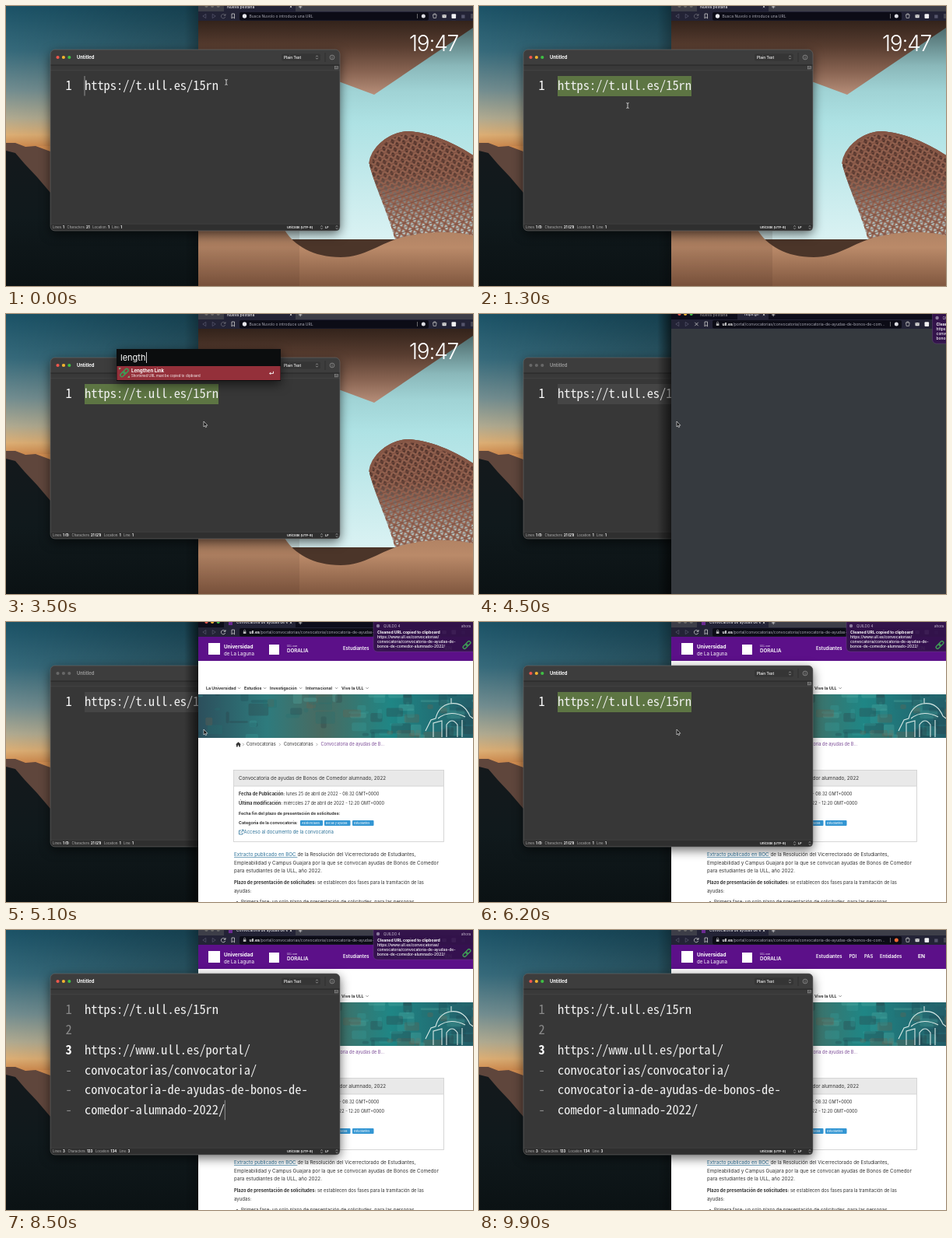
An HTML page for the animation above (10 s loop, 600x360 px).

```html
<!DOCTYPE html>
<html lang="es">
<head>
<meta charset="utf-8">
<style>
html, body { margin: 0; width: 100%; height: 100%; overflow: hidden; background: #061015; }
svg { display: block; width: 600px; height: 360px; }
text { font-family: Inter, "Open Sans", sans-serif; fill: #fff; white-space: pre; }
.mono text { font-family: "Noto Sans Mono CJK JP", "Noto Sans Mono CJK SC", "Noto Sans Mono", monospace; }
.frame { filter: drop-shadow(0 4px 7px rgba(0,0,0,.6)); }
.off .dot { fill: #686868; }
.off .active { opacity: .45; }
.tabs { fill: #0d0d1b; }
.off .tabs { fill: #3d3e48; }
.site text { fill: #333; }
.site .w text, .site text.w { fill: #fff; }
</style>
</head>
<body>
<svg id="stage" viewBox="0 0 600 360"></svg>
<script>
const LOOP = 10000;
const stage = document.getElementById('stage');
const $ = id => document.getElementById(id);

// Text is placed by its left edge and the middle of its capitals.
const txt = (x, y, size, s, attrs = '') =>
  `<text x="${x}" y="${y + size * .36}" font-size="${size}" ${attrs}>${s}</text>`;
const bold = s => `<tspan font-weight="700">${s}</tspan>`;
const B = 'font-weight="700"';
const rect = (x, y, w, h, fill, attrs = '') =>
  `<rect x="${x}" y="${y}" width="${w}" height="${h}" fill="${fill}" ${attrs}/>`;
const dot = (x, y, r, fill, cls = '') => `<circle class="${cls}" cx="${x}" cy="${y}" r="${r}" fill="${fill}"/>`;
const path = (d, fill, attrs = '') => `<path d="${d}" fill="${fill}" ${attrs}/>`;
const line = (d, color, w = .7, attrs = '') => path(d, 'none', `stroke="${color}" stroke-width="${w}" ${attrs}`);
const group = (id, body, attrs = '') => `<g id="${id}" ${attrs}>${body}</g>`;
const grad = (id, stops, dir = 'x2="0" y2="1"') => `<linearGradient id="${id}" ${dir}>` +
  stops.map(([o, c]) => `<stop offset="${o}" stop-color="${c}"/>`).join('') + '</linearGradient>';
const lights = (x, y, step, r) => ['#f0574c', '#f2b32f', '#3fc044']
  .map((c, i) => dot(x + i * step, y, r, c, 'dot')).join('');
const updown = (x, y) => line(`M${x - 1.2} ${y - .8}l1.2-1.4 1.2 1.4m-2.4 1.6l1.2 1.4 1.2-1.4`, '#ccc', .6);
const chain = (x, y, k) => `<g transform="translate(${x} ${y}) rotate(-45) scale(${k})" fill="none" stroke="#3f9a56" stroke-width="2">
  <rect x="-8" y="-2.6" width="9" height="5.2" rx="2.6"/><rect x="-1" y="-2.6" width="9" height="5.2" rx="2.6"/></g>`;

let seed = 7;
const rnd = () => (seed = seed * 16807 % 2147483647) / 2147483647;

// Mono size that gives the editor its character advance.
const ADV = 8.19;
const pen = document.createElement('canvas').getContext('2d');
pen.font = '100px "Noto Sans Mono CJK JP", "Noto Sans Mono CJK SC", "Noto Sans Mono", monospace';
const MONO = ADV * 100 / pen.measureText('0').width;

const defs = `<defs>
  ${grad('sky', [[0, '#1b5266'], [.16, '#366a7b'], [.3, '#728d90'], [.4, '#b0aa90'], [.46, '#dcae74'], [.5, '#d08c50']])}
  ${grad('land', [[0, '#14191c'], [.5, '#10191c'], [1, '#0b1214'] ])}
  ${grad('roof', [[0, '#33231b'], [.35, '#583d30'], [.7, '#8a6553'], [1, '#b78f7a']])}
  ${grad('air', [[0, '#4d6a6c'], [.18, '#8ab8ba'], [.3, '#a0d3d5'], [.45, '#aee2e4'], [1, '#daf2f3']])}
  ${grad('sand', [[0, '#a97c5f'], [.45, '#ba8a69'], [1, '#80573f']])}
  ${grad('inside', [[0, '#4b2e27'], [.35, '#54382f'], [.75, '#b3c3c1'], [1, '#cfe3e2']])}
  ${grad('paint', [[0, '#2c4f5c'], [.25, '#2e7b7d'], [.45, '#4a6a60'], [.7, '#1f8685'], [1, '#235d68']], '')}
  <linearGradient id="edge"><stop stop-color="#000" stop-opacity="0"/><stop offset="1" stop-color="#000" stop-opacity=".6"/></linearGradient>
  <pattern id="mesh" width="9" height="11" patternUnits="userSpaceOnUse" patternTransform="rotate(-18)">
    <path d="M0 0L9 11M9 0L0 11" stroke="#94624f" stroke-width="2.4"/><path d="M0 5.5H9M0 0H9M0 11H9" stroke="#7a4c3e" stroke-width="1.2"/>
  </pattern>
  <clipPath id="strip"><rect x="247" y="93" width="353" height="56"/></clipPath>
</defs>`;

const desktop = rect(0, 0, 600, 360, 'url(#sky)') + rect(0, 0, 247, 180, 'url(#edge)', 'opacity=".4"') +
  path('M0 176L12 176 25 181 38 180 57 187 120 205 247 195V260H0Z', '#5f463c') +
  path('M0 186L12 189 24 203 40 220 57 240 120 262 190 240 247 225V360H0Z', 'url(#land)');

const towerShape = 'M467 205C467 183 490 163 515 161C545 162 575 176 600 192V320H505C494 272 476 238 467 205Z';
const photo = rect(247, 19, 353, 341, '#4b3529') +
  path('M300 28H600V300H300Z', 'url(#air)') +
  path('M247 19H600V28L473 114 430 98 247 60Z', 'url(#roof)') +
  path(towerShape, 'url(#inside)') + path(towerShape, 'url(#mesh)') +
  line('M468 203C470 184 491 165 515 163C545 164 575 178 600 194', '#855645', 4) +
  path('M247 270H350L358 288C370 308 395 323 430 323C465 323 485 300 520 295C550 289 575 290 600 295V360H247Z', 'url(#sand)') +
  rect(247, 270, 130, 90, '#3a2619', 'opacity=".12"') +
  txt(518, 48, 28, '19:47', 'font-weight="300" letter-spacing="-1.2"');

function banner() {
  let s = rect(247, 93, 353, 56, 'url(#paint)');
  const tones = ['#1d4651', '#39a09a', '#705f4b', '#24706f', '#56b1a5', '#2a3c43'];
  for (let i = 0; i < 90; i++) {
    s += rect(240 + rnd() * 360, 86 + rnd() * 60, 4 + rnd() * 22, 2 + rnd() * 14, tones[i % 6], 'rx="2" opacity=".3"');
  }
  s += line('M539 140L546 126 552 124Q556 108 570 105Q588 102 596 121L600 124M549 148V130L560 127V148M566 148V132Q573 122 580 132V148M555 124Q570 112 590 122M572 105V98M586 148V126', '#d7e8e5', 1.1);
  return `<g clip-path="url(#strip)">${s}</g>`;
}

const chevron = x => line(`M${x} 84.2l1.6 1.6 1.6-1.6`, '#444', .6);
const menu = [['La Universidad', 257, 298], ['Estudios', 306, 331], ['Investigación', 339, 377],
  ['Internacional', 385, 423], ['Vive la ULL', 431, 462.5]]
  .map(([s, x, c]) => txt(x, 85, 5.3, s, B) + chevron(c)).join('');
const tag = (x, w, s) => rect(x, 255, w, 7, '#3396d3', 'rx="1"') + txt(x + 2, 258.5, 3.7, s, 'class="w"');
const link = 'style="fill:#2c7299"';

const site = rect(247, 19, 353, 341, '#fff') + rect(247, 19, 353, 31, '#5c1089') +
  `<g class="w">${rect(260, 27, 15, 15, '#fff')}${txt(280, 32, 6.4, 'Universidad', B)}${txt(280, 41, 6.1, 'de La Laguna')}
  ${rect(338, 29, 13, 13, '#fff')}${txt(361, 30.5, 3.4, 'ULL con')}${txt(361, 37, 6.2, 'DORALIA', 'font-weight="600"')}
  ${[['Estudiantes', 433], ['PDI', 475.5], ['PAS', 495], ['Entidades', 515]].map(([s, x]) => txt(x, 34, 5.9, s, 'font-weight="600"')).join('')}
  ${txt(564, 34, 6.6, 'EN', B)}</g>` + menu + banner() +
  path('M295 157.5l3.5-3.3 3.5 3.3h-1v3h-1.7v-2h-1.6v2H296v-3z', '#333') +
  [305, 352, 399.5].map(x => line(`M${x - 1} 155.8l1.6 1.7-1.6 1.7`, '#777', .6)).join('') +
  txt(309, 157.5, 5.5, 'Convocatorias') + txt(357, 157.5, 5.5, 'Convocatorias') +
  txt(404.5, 157.5, 5.55, 'Convocatoria de ayudas de B...', 'style="fill:#7a4a96"') +
  rect(292.5, 190.5, 270, 92, '#fff', 'stroke="#ccc" stroke-width=".8"') + rect(293, 191, 269, 20, '#e9e9e9') +
  line('M293 211H562', '#ccc', .8) +
  txt(299, 200.5, 6.25, 'Convocatoria de ayudas de Bonos de Comedor alumnado, 2022') +
  txt(299, 221.5, 5.55, bold('Fecha de Publicación:') + ' lunes 25 de abril de 2022 - 08:32 GMT+0000') +
  txt(299, 233.5, 5.55, bold('Última modificación:') + ' miércoles 27 de abril de 2022 - 12:20 GMT+0000') +
  txt(299, 245.8, 5.3, 'Fecha fin del plazo de presentación de solicitudes:', B) +
  txt(299, 258, 5.3, 'Categoría de la convocatoria:', B) +
  tag(378, 29, 'Asistenciales') + tag(409, 33.5, 'Becas y ayudas') + tag(445, 27.5, 'Estudiantes') +
  line('M302 268H299.5V273H304V271M301.5 271L305 267.3M302.8 267.2H305V269.5', '#2c7299', .8) +
  txt(305.5, 270, 6, 'Acceso al documento de la convocatoria', link) +
  txt(293, 299, 6.25, '<tspan style="fill:#2c7299" text-decoration="underline">Extracto publicado en BOC </tspan>de la Resolución del Vicerrectorado de Estudiantes,') +
  txt(293, 309.5, 6.35, 'Empleabilidad y Campus Guajara por la que se convocan ayudas de Bonos de Comedor') +
  txt(293, 320, 6.3, 'para estudiantes de la ULL, año 2022.') +
  txt(293, 335, 5.8, bold('Plazo de presentación de solicitudes:') + ' se establecen dos fases para la tramitación de las') +
  txt(293, 346, 6.1, 'ayudas:') +
  txt(302, 359.5, 6.1, 'Primera fase: un solo plazo de presentación de solicitudes, para las personas') + dot(297, 360, .9, '#333');

const URL_TEXT = bold('ull.es') + '<tspan fill="#a9a9b4">/portal/convocatorias/convocatoria/convocatoria-de-ayudas-de-bonos-de-com...</tspan>';
const closeX = (x, y, r, c = '#ccc') => line(`M${x - r} ${y - r}l${2 * r} ${2 * r}m0-${2 * r}l-${2 * r} ${2 * r}`, c, .8);
const arrowHead = (x, dx) => line(`M${x} 10.4v5.2l${dx}-2.6z`, '#5a5a70');

const browser = rect(229, 0, 18, 360, 'url(#edge)', 'id="edgeShade"') + rect(247, 0, 353, 19, '#232336') +
  '<rect class="tabs" x="247" width="353" height="7"/>' +
  rect(280, 0, 92, 7, '#232336') + lights(257.5, -.2, 7.6, 2.1) +
  group('tabNew', txt(284, .7, 5, 'Nueva pestaña')) +
  group('tabLoad', '<rect class="tabs" x="280" width="52" height="7"/>' + txt(284, .7, 5, 'Nueva pestaña', 'style="fill:#999"') + txt(341, .7, 4.8, 'https:gh')) +
  group('tabSite', rect(286, -1, 5, 5, '#6b2a92') + txt(296, .7, 4.8, 'Convocatoria de ayudas de e')) +
  closeX(366, 1, 1.2) + line('M376 1h4.4M378.2-1.2v4.4', '#ddd', .8) +
  arrowHead(256.8, -4) + arrowHead(265.2, 4) +
  group('reload', line('M281.6 12A2.7 2.7 0 1 0 281.7 14M282 10V12.3H279.6', '#ccc', .8)) + group('stop', closeX(279.5, 13, 2.2)) +
  line('M290 10h3.5v6l-1.75-1.6-1.75 1.6z', '#ccc', .8) + rect(300, 8, 243, 10.4, '#0c0c16', 'rx="2"') +
  group('hint', dot(306.5, 13, 2.7, '#e8e8ee') + txt(312.5, 13, 5, 'Busca Nuvolo o introduce una URL', 'style="fill:#a7a7b2"')) +
  group('address', rect(304.8, 12.2, 3.6, 2.8, '#bbb') + line('M305.5 12.2v-1a1.1 1.1 0 0 1 2.2 0v1', '#bbb', .6) + txt(312.5, 13, 5.05, URL_TEXT)) +
  line('M528.5 10v6', '#aaa', .6) + '<circle id="badge" cx="536.3" cy="13" r="2.5"/>' +
  line('M548.5 11h4.6l-.6 4.4h-3.4zM549.6 10.6v-.6h2.4v.6', '#bbb', .8) +
  rect(560.5, 11, 5.2, 4.2, '#ddd', 'rx=".6"') + line('M560.8 11.3l2.3 1.9 2.3-1.9', '#333', .5) +
  rect(572.5, 10.2, 5.6, 5.8, '#f2f2f4', 'rx="1"') + rect(585.2, 11.4, 4.3, 4.3, '#55556c') + line('M597 11h3M597 13h3M597 15h3', '#888', .7) +
  group('newTab', photo) + group('blank', rect(247, 19, 353, 341, '#363a3f')) + group('site', site, 'class="site"');

const editor = rect(57, 56, 372, 233, '#373737', 'rx="6" class="frame"') +
  path('M57 76V62a6 6 0 0 1 6-6H423a6 6 0 0 1 6 6V76Z', '#3d3d3d') + rect(57, 76, 372, 7, '#393939') +
  line('M57 76H429', '#1f1f1f', .8) + line('M57 82.8H429', '#4a4a4a', .6) +
  lights(66.5, 66, 7.4, 2.1) + `<g class="active">${txt(91, 66, 5.8, 'Untitled', B)}
  ${rect(354, 61.5, 50, 9, '#353535', 'rx="2"')}${txt(357, 66, 4.8, 'Plain Text', 'font-weight="500"')}${updown(399.5, 66)}
  ${line('M410 60V72', '#2a2a2a', .6)}<circle cx="419" cy="66" r="2.9" fill="none" stroke="#aaa" stroke-width=".6"/>${line('M419 65.3v2.4M419 64v.6', '#aaa', .6)}</g>` +
  rect(422.5, 77.5, 4, 3.4, 'none', 'stroke="#999" stroke-width=".6"') + line('M422.5 79.2h4M424.5 79.2v1.7', '#999', .5) +
  group('doc', '', 'class="mono"') + rect(57.4, 280.5, 371.2, 4, '#2f2f2f') + rect(57.4, 280.5, 371.2, 8.2, '#2f2f2f', 'rx="4"') + line('M57 280.3H429', '#484848', .5) +
  group('status', '') + `<g class="active">${txt(361, 284.6, 4.1, 'Unicode (UTF-8)', 'font-weight="600"')}${updown(405.5, 284.6)}${txt(410, 284.6, 4.1, 'LF', 'font-weight="600"')}${updown(425, 284.6)}</g>` +
  rect(57, 56, 372, 233, 'none', 'rx="6" stroke="#777" stroke-width=".6" opacity=".8"');

const launcher = rect(142, 45, 211, 41, '#0b0d0e', 'class="frame"') + group('query', '') +
  group('result', rect(142.5, 67, 210, 18, '#94303a') + chain(152, 75.5, .8) + path('M145 69l3 .4-2.5 2.3zM159 82l-3-.4 2.5-2.3z', '#7fc08a') +
    txt(161, 73, 6.1, 'Lengthen Link', B) + txt(161, 79.3, 4.3, 'Shortened URL must be copied to clipboard') +
    line('M343.5 73.8v2.6h-4.8m1.5-1.5l-1.5 1.5 1.5 1.5', '#fff', .9));

const notice = rect(0, -6, 134, 44, '#33124c', 'rx="5" opacity=".95" stroke="#6b4a80" stroke-width=".5"') + dot(6, 5, 2.2, '#8b7a9c') +
  txt(13, 5, 4.5, 'QUILDO 4', 'style="fill:#c9bdd2"') + txt(113, 5, 4.5, 'ahora', 'style="fill:#c9bdd2"') +
  txt(5, 13, 5.1, 'Cleaned URL copied to clipboard', B) +
  ['https://www.ull.es/convocatorias/', 'convocatoria/convocatoria-de-ayudas-de-', 'bonos-de-comedor-alumnado-2022/']
    .map((s, i) => txt(5, 19.3 + i * 6, 4.9, s, 'font-weight="500"')).join('') + chain(120, 29.5, .75);

stage.innerHTML = defs + desktop +
  group('windows', group('browser', browser) + group('editor', editor)) +
  group('launcher', launcher) + group('notice', notice) +
  group('beam', line('M-1.6-3.4Q0-3.4 0-2.4Q0-3.4 1.6-3.4M0-2.6V2.6M-1.6 3.4Q0 3.4 0 2.4Q0 3.4 1.6 3.4', '#eee', .8)) +
  group('arrow', path('M0-3V4L1.6 2.6 2.6 4.8 3.6 4.3 2.7 2.2H4.8Z', '#111', 'stroke="#fff" stroke-width=".6"'));

const show = (id, on) => $(id).setAttribute('display', on ? 'inline' : 'none');
const clamp = v => Math.max(0, Math.min(1, v));
const ease = (t, start, length) => (1 - Math.cos(Math.PI * clamp((t - start) / length))) / 2;
const within = (t, ...spans) => spans.some(([a, b]) => t >= a && t < b);

const SHORT = 'https://t.ull.es/15rn';
const LONG = ['https://www.ull.es/portal/', 'convocatorias/convocatoria/',
  'convocatoria-de-ayudas-de-bonos-de-', 'comedor-alumnado-2022/'];

function drawEditor(t, front) {
  const selected = t >= 700 && t < 7000, pasted = t >= 8400;
  const count = t < 7500 ? 1 : t < 7700 ? 2 : 3;
  const rows = [[1, SHORT], [2, ''], [3, '']].slice(0, count);
  if (pasted) rows.splice(2, 1, ...LONG.map((s, i) => [i ? '-' : 3, s]));
  const y = i => 102.5 + i * 25.75;
  const numberStyle = n => n < count || n === '-' ? 'style="fill:#8a8a8a"' : t < 7000 ? '' : B;
  let s = selected ? rect(101, 90, ADV * 21, 26, front ? '#5d7543' : '#454545') : '';
  rows.forEach(([n, words], i) => {
    s += txt(84.8, y(i), MONO, n, 'text-anchor="end" ' + numberStyle(n));
    s += txt(101, y(i), MONO, words, 'style="fill:#f1f1f1"');
  });
  if (within(t, [0, 500], [7000, 8100], [8400, 9100], [9500, 9900])) {
    const i = rows.length - 1, col = t < 700 ? 0 : rows[i][1].length;
    s += rect(101 + col * ADV - .3, y(i) - 12.5, .6, 25.5, '#ccc');
  }
  $('doc').innerHTML = s;

  const chars = pasted ? 133 : 20 + count;
  const pair = (k, v) => `<tspan fill="#b5b5b5">${k}: </tspan>${bold(v)}   `;
  $('status').innerHTML = txt(60, 284.6, 4.25, pair('Lines', count + (selected ? ' (1)' : '')) +
    pair('Characters', chars + (selected ? ' (21)' : '')) + pair('Location', t < 7000 ? 1 : chars + 1) + pair('Line', count));
}

function drawPointer(t, front) {
  const a = ease(t, 300, 900), b = ease(t, 1400, 300), c = ease(t, 6300, 600);
  const x = 283 - 92 * a + 63 * b + 36 * c, y = 98 + 30 * a + 13 * b - 36 * c;
  const beam = front && (t < 2600 || t >= 6300);
  for (const id of ['beam', 'arrow']) $(id).setAttribute('transform', `translate(${x} ${y})`);
  show('beam', beam && t < 7500);
  show('arrow', !beam);
}

function draw(now) {
  const t = now % LOOP;
  const front = t < 4200 || t >= 5900;
  const fresh = t < 4200, loading = !fresh && t < 4800, loaded = t >= 4800;
  const top = $(front ? 'editor' : 'browser');
  if ($('windows').lastChild !== top) $('windows').append(top);
  $('editor').setAttribute('class', front ? '' : 'off');
  $('browser').setAttribute('class', front ? 'off' : '');
  $('edgeShade').setAttribute('opacity', front ? .4 : 1);

  for (const id of ['tabNew', 'hint', 'newTab']) show(id, fresh);
  for (const id of ['tabLoad', 'stop', 'blank']) show(id, loading);
  for (const id of ['tabSite', 'site']) show(id, loaded);
  show('address', !fresh);
  show('reload', !loading);
  $('reload').setAttribute('opacity', fresh ? .4 : 1);
  $('badge').setAttribute('fill', loaded ? '#ee6a35' : '#dcdce2');
  drawEditor(t, front);

  const typed = 'lengthen'.slice(0, Math.max(0, Math.floor((t - 2900) / 100)));
  show('launcher', within(t, [2600, 4000]));
  show('result', typed.length > 0);
  $('query').innerHTML = txt(147, 56.5, 11, typed);
  const end = 147 + (typed ? $('query').firstChild.getComputedTextLength() : 0);
  $('query').innerHTML += rect(end + .6, 49, .8, 14, '#fff');

  const slide = 128 * (1 - ease(t, 4400, 420) + ease(t, 9500, 300));
  $('notice').setAttribute('transform', `translate(${472 + slide} 0)`);
  show('notice', within(t, [4400, 9800]));
  drawPointer(t, front);
  requestAnimationFrame(draw);
}
requestAnimationFrame(draw);
</script>
</body>
</html>
```
